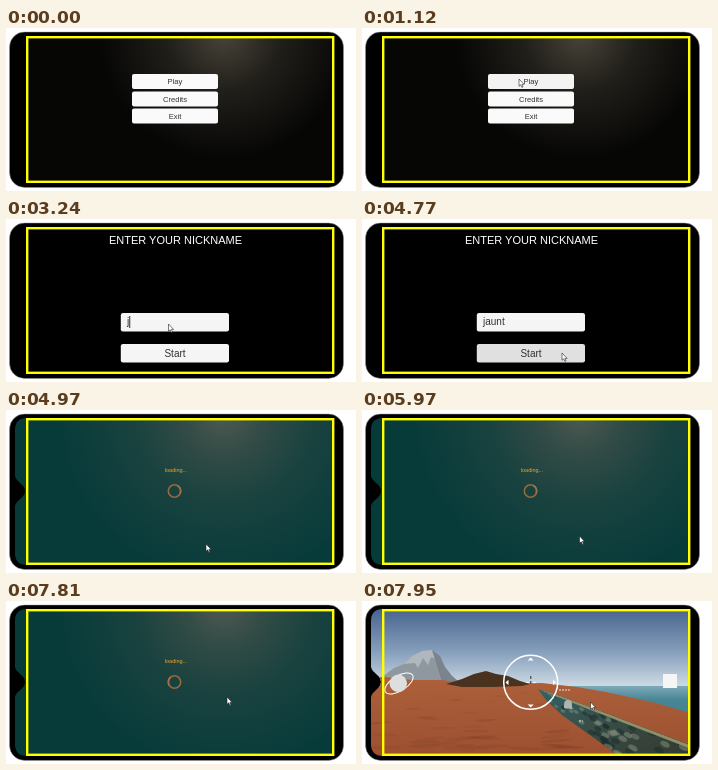
Animation of 350 by 163 pixels, one loop 8 s. Source, as an HTML page:

```html
<!DOCTYPE html>
<html lang="en">
<head>
<meta charset="utf-8">
<title>Game menu</title>
<style>
  html, body { margin: 0; width: 100%; height: 100%; overflow: hidden; background: #fff; }
  svg { display: block; width: 350px; height: 163px; }
  text { font-family: "Liberation Sans", Arial, sans-serif; fill: #323232; }
  .mid { text-anchor: middle; }
  .small { font-size: 7.6px; }
  .big { font-size: 10px; }
</style>
</head>
<body>
<svg viewBox="0 0 350 163">
  <defs>
    <radialGradient id="glow" gradientUnits="userSpaceOnUse" cx="218" cy="6" r="125">
      <stop offset="0" stop-color="#48443a"/>
      <stop offset=".45" stop-color="#211f1a"/>
      <stop offset="1" stop-color="#060605"/>
    </radialGradient>
    <radialGradient id="teal" gradientUnits="userSpaceOnUse" cx="218" cy="4" r="165">
      <stop offset="0" stop-color="#4d5a51"/>
      <stop offset=".25" stop-color="#324b46"/>
      <stop offset=".55" stop-color="#19423f"/>
      <stop offset="1" stop-color="#073b3a"/>
    </radialGradient>
    <linearGradient id="sky" x1="0" y1="0" x2="0" y2="1">
      <stop offset="0" stop-color="#48648e"/>
      <stop offset=".55" stop-color="#869fbc"/>
      <stop offset="1" stop-color="#cfdce5"/>
    </linearGradient>
    <linearGradient id="sand" x1="0" y1="0" x2="0" y2="1">
      <stop offset="0" stop-color="#ad603a"/>
      <stop offset="1" stop-color="#9c5031"/>
    </linearGradient>
    <linearGradient id="sea" x1="0" y1="0" x2="0" y2="1">
      <stop offset="0" stop-color="#7ea9b7"/>
      <stop offset=".2" stop-color="#488595"/>
      <stop offset="1" stop-color="#397586"/>
    </linearGradient>
    <linearGradient id="stone" x1="0" y1="0" x2="1" y2="1">
      <stop offset="0" stop-color="#2f6366"/>
      <stop offset=".4" stop-color="#38504b"/>
      <stop offset="1" stop-color="#34392f"/>
    </linearGradient>
    <clipPath id="screen">
      <path d="M21 8H328V155H21Q9 155 9 143V96C10 90 19 88 19 81C19 74 10 72 9 66V20Q9 8 21 8Z"/>
    </clipPath>
    <clipPath id="wall">
      <path d="M176 88L199 95L228 106L328 144V155H257L225 132L200 114L184 99Z"/>
    </clipPath>
  </defs>

  <rect x="3.5" y="4" width="334" height="155.5" rx="15" stroke="#999" stroke-width=".5"/>

  <g id="menu">
    <rect x="22" y="10" width="304" height="143" fill="url(#glow)"/>
    <g fill="#fafafa">
      <rect id="play" x="126" y="46" width="86" height="15" rx="2"/>
      <rect x="126" y="63.5" width="86" height="15" rx="2"/>
      <rect x="126" y="80.5" width="86" height="15" rx="2"/>
    </g>
    <g class="mid small">
      <text x="169" y="56.2">Play</text>
      <text x="169" y="73.7">Credits</text>
      <text x="169" y="90.7">Exit</text>
    </g>
  </g>

  <g id="login">
    <text class="mid" x="169.5" y="25.3" font-size="11" style="fill:#fff">ENTER YOUR NICKNAME</text>
    <rect x="114.8" y="94" width="108.2" height="18.5" rx="2.2" fill="#f5f5f5"/>
    <rect id="start" x="114.8" y="125" width="108.2" height="18.5" rx="2.2"/>
    <text id="nick" class="big" x="121" y="106.4"></text>
    <rect id="caret" y="97" width="1" height="12" fill="#323232"/>
    <text class="mid big" x="169" y="137.6">Start</text>
  </g>

  <g id="load">
    <rect x="9" y="8" width="319" height="147" fill="url(#teal)" clip-path="url(#screen)"/>
    <text class="mid" x="170" y="62" font-size="5.5" style="fill:#f0a62c">loading...</text>
    <g fill="none" stroke-width="1.6">
      <circle cx="168.5" cy="81" r="6.2" stroke="#96683f"/>
      <path id="arc" d="M168.5 74.8A6.2 6.2 0 0 1 174.7 81" stroke="#a67142"/>
    </g>
  </g>

  <g id="game" clip-path="url(#screen)">
    <rect x="9" y="8" width="319" height="78" fill="url(#sky)"/>
    <rect x="160" y="85" width="168" height="70" fill="url(#sea)"/>
    <path d="M9 84L21 75L32 67L42 63L50 55L60 50L70 49L78 55L83 66L90 75L97 81V90H9Z" fill="#8f989f"/>
    <path d="M50 55L60 50L70 49L74 58L69 56L66 64L61 57L56 67L53 62L42 63Z" fill="#b0b8be"/>
    <path d="M70 49L78 55L83 66L90 75L97 81H80Z" fill="#7b848d"/>
    <path d="M9 76L24 76L50 79L80 79L100 82L140 83L180 82L215 86L244 91L294 102L328 112V155H9Z" fill="url(#sand)"/>
    <path d="M84 83L100 78L112 73L124 70L134 73L146 75L158 80L168 83L160 85L130 86L100 86Z" fill="#49331f"/>
    <g id="ripples" fill="#743a23"></g>
    <g clip-path="url(#wall)">
      <rect x="176" y="88" width="152" height="67" fill="url(#stone)"/>
      <g id="moss"></g>
      <path d="M176 88L199 95L228 106L328 144V147.5L226 108L196 96Z" fill="#8b9069"/>
    </g>
    <path d="M202 107V104Q202 99 206 99Q210 99 210 104V108Z" fill="#aeb4b2"/>
    <path d="M197 89H209M217 120H221" stroke="#dde2e2" stroke-dasharray="2 1"/>
    <g fill="none" stroke="#fff">
      <circle cx="168.7" cy="81.3" r="27" stroke-width="1.5"/>
      <ellipse cx="37" cy="82.5" rx="16" ry="7.5" transform="rotate(-32 37 82.5)"/>
      <path d="M164 81.5H167M171 81.5H174" stroke-width=".8"/>
    </g>
    <path d="M168.8 75V78M168.8 80V83" stroke="#333"/>
    <g fill="#fff">
      <path d="M168.7 56.5L171.700 59.5H165.7ZM168.7 106.500L171.700 103.5H165.7ZM143.5 81.5L146.5 78.7V84.300ZM194 81.5L191 78.7V84.300Z"/>
      <circle cx="36.3" cy="82.3" r="8.7" fill="#dcdfde"/>
      <rect x="301" y="73" width="14" height="14" fill="#f4f5f5"/>
    </g>
  </g>

  <rect x="21.2" y="9.2" width="306" height="144.6" fill="none" stroke="#ff0" stroke-width="2.4"/>
  <path id="cursor" d="M0 0V7.300L1.700 5.800L2.900 8.400L4 7.900L2.900 5.400H5.100Z" fill="#fff" stroke="#222" stroke-width=".6"/>
</svg>

<script>
const LOOP = 8000;
const NICK = "jaunt";
const KEYS = [3240, 3440, 3530, 3610, 3700];
const CUT = { login: 1180, load: 4900, game: 7880 };

// time, x, y of the pointer tip
const PATH = [
  [120, 258, 145], [420, 212, 108], [720, 165, 62], [920, 150, 45],
  [1110, 157, 51], [1380, 157, 51], [1700, 160, 80], [2030, 163, 105],
  [3235, 163, 105], [3245, 162, 105], [4100, 162, 105], [4420, 180, 121],
  [4720, 200, 134], [4970, 200, 134], [5760, 211, 133], [5970, 217.5, 126],
  [6200, 207, 96], [6620, 166, 31], [6760, 134, 4], [7020, 134, 4],
  [7280, 158, 47], [7550, 196, 78], [7810, 221, 96], [7950, 228.5, 101]
];

const $ = id => document.getElementById(id);
const set = (el, key, value) => el.setAttribute(key, value);
const show = (id, on) => { $(id).style.display = on ? "" : "none"; };
const clamp = (v, a, b) => Math.min(b, Math.max(a, v));
const mix = (a, b, k) => a + (b - a) * k;

function pointer(t) {
  const i = PATH.findIndex(p => p[0] > t);
  if (i < 0) return PATH[PATH.length - 1].slice(1);
  const [t0, x0, y0] = PATH[Math.max(0, i - 1)];
  const [t1, x1, y1] = PATH[i];
  const k = t1 > t0 ? (t - t0) / (t1 - t0) : 0;
  return [mix(x0, x1, k), mix(y0, y1, k)];
}

let seed = 7;
const rnd = () => (seed = seed * 16807 % 2147483647) / 2147483647;

function scatter(id, count, spot) {
  let out = "";
  for (let i = 0; i < count; i++) {
    const { x, y, rx, ry, turn = 0, opacity, fill = "" } = spot(i);
    out += `<ellipse rx="${rx}" ry="${ry}" opacity="${opacity}" ${fill && `fill="${fill}"`}
      transform="translate(${x} ${y}) rotate(${turn})"/>`;
  }
  $(id).innerHTML = out;
}

function addTexture() {
  scatter("ripples", 40, () => {
    const d = rnd();
    return {
      x: 12 + rnd() * (160 + 60 * d), y: 92 + 60 * d,
      rx: 5 + 13 * d, ry: 0.6 + 1.2 * d, turn: -6 + 12 * rnd(), opacity: 0.08 + 0.16 * rnd()
    };
  });
  // u runs along the wall, v from its top edge to its foot
  scatter("moss", 60, i => {
    const u = rnd(), v = rnd();
    return {
      x: mix(mix(182, 328, u), mix(182, 257, u), v),
      y: mix(mix(90, 146, u), mix(97, 155, u), v),
      rx: 1.5 + 4 * u, ry: 1 + 2 * u, turn: 28, opacity: 0.5,
      fill: i % 2 ? "#87917f" : "#1d2b29"
    };
  });
}

function draw(t) {
  const [x, y] = pointer(t);
  show("menu", t < CUT.login);
  show("login", t >= CUT.login && t < CUT.load);
  show("load", t >= CUT.load && t < CUT.game);
  show("game", t >= CUT.game);
  show("cursor", t >= 120);
  set($("cursor"), "transform", `translate(${x} ${y})`);

  set($("play"), "fill", t > 780 ? "#f3f3f3" : "#fafafa");
  const shade = 245 - 21 * clamp((t - 4560) / 100, 0, 1);
  set($("start"), "fill", `rgb(${shade},${shade},${shade})`);

  const nick = $("nick");
  nick.textContent = NICK.slice(0, KEYS.filter(k => t >= k).length);
  const caretOn = (t >= 1900 && t < 2430) || (t >= 2960 && t < 4400);
  show("caret", caretOn);
  if (caretOn) set($("caret"), "x", 121 + (nick.textContent ? nick.getComputedTextLength() : 0));

  // the spinner stalls while the level loads
  const spin = Math.min(t, 6760) + Math.max(0, t - 7020) - CUT.load;
  set($("arc"), "transform", `rotate(${spin * 0.36} 168.5 81)`);
}

addTexture();
draw(0);
let begin;
function tick(now) {
  begin ??= now;
  draw((now - begin) % LOOP);
  requestAnimationFrame(tick);
}
requestAnimationFrame(tick);
</script>
</body>
</html>
```
